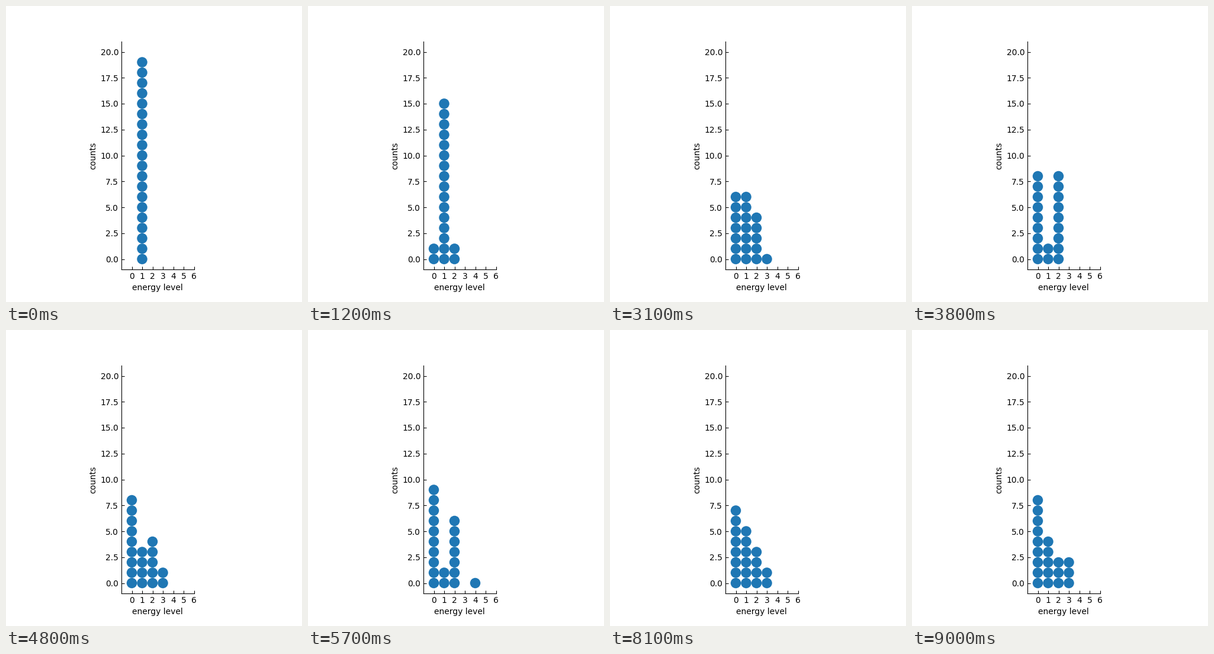
Recreate the animation shown at these times as a matplotlib script. Size 500 by 500 pixels, loop 10000 ms.

```python
from itertools import pairwise

import matplotlib.pyplot as plt
from matplotlib.animation import FuncAnimation
from matplotlib.patches import Circle

STEPS = 100
PARTICLES = 20
ENERGY = 20
LEVELS = 7

# step: particles on levels 2, 3 and 4
KEY_STATES = {
    0: (0, 0, 0), 3: (3, 0, 0), 8: (5, 0, 0), 14: (3, 1, 0), 29: (1, 2, 0),
    37: (5, 1, 0), 43: (9, 0, 0), 48: (8, 0, 0), 52: (5, 2, 0),
    59: (7, 0, 1), 65: (5, 0, 1), 68: (7, 1, 0), 76: (4, 2, 0), 89: (3, 3, 0),
}


def upper_levels(step):
    """Whole particles moved so far on the way to the next key state."""
    for start, end in pairwise(KEY_STATES):
        if step < end:
            progress = (step - start) / (end - start)
            return [a + int((b - a) * progress)
                    for a, b in zip(KEY_STATES[start], KEY_STATES[end])]
    return list(KEY_STATES[end])


def occupation(step):
    """Levels 0 and 1 follow from the fixed energy and particle number."""
    upper = upper_levels(step)
    first = ENERGY - sum(level * n for level, n in enumerate(upper, 2))
    return [PARTICLES - first - sum(upper), first, *upper]


# Steps play in alphabetical order: 0, 1, 10, 11, ..., 19, 2, 20, ...
play_order = sorted(range(STEPS), key=str)

fig, ax = plt.subplots(figsize=(5, 5), dpi=100)
ax.set_aspect("equal")
ax.set_xlim(-1, 6)
ax.set_ylim(-1, 21)
ax.set_xticks(range(LEVELS))
ax.set_yticks([2.5 * i for i in range(9)])
ax.tick_params(direction="in")
ax.spines[["top", "right"]].set_visible(False)
ax.set_xlabel("energy level")
ax.set_ylabel("counts")
dots = [ax.add_patch(Circle((1, row), 0.5, facecolor="C0", linewidth=0))
        for row in range(PARTICLES)]


def update(frame):
    counts = occupation(play_order[frame])
    spots = [(level, row) for level, n in enumerate(counts) for row in range(n)]
    for dot, spot in zip(dots, spots):
        dot.set_center(spot)
    return dots


anim = FuncAnimation(fig, update, frames=STEPS, interval=100, repeat=True,
                     repeat_delay=0)
plt.show()
```
